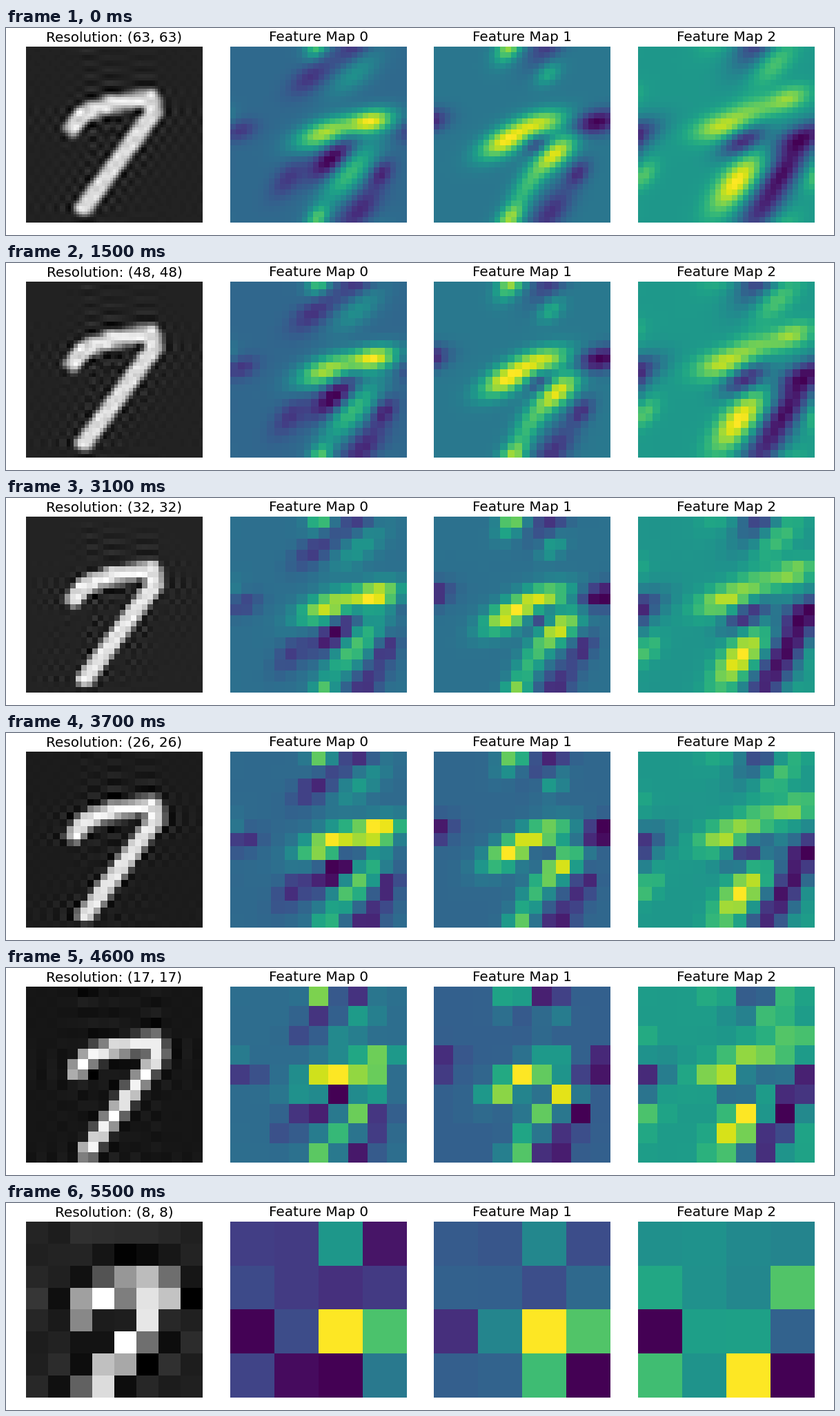
A matplotlib script that plays this animation: 1200x300 px, repeating every 5.6 s.

```python
import numpy as np
import matplotlib.pyplot as plt
from matplotlib.animation import FuncAnimation

W, H, DPI = 1200, 300, 120
LEFT, PITCH, TOP = 29, 295.7, 27
SIDE, TALL = 256, 255
SIZES = range(63, 7, -1)

# Pen path of the digit in panel pixels
PEN = [(68, 118), (82, 98), (124, 83), (182, 75), (184, 97), (84, 234)]
PEN_RADIUS = 12

# Base level, then blobs as x, y, height, length
MAPS = [
    (0.31, [(207, 110, .64, 24), (138, 128, .56, 32), (150, 166, -.42, 28),
            (85, 195, -.18, 24), (175, 186, .37, 40), (128, 254, .38, 15),
            (222, 187, -.25, 15), (190, 242, -.24, 32), (118, 45, -.2, 26),
            (182, 40, .18, 32), (14, 124, -.19, 18)]),
    (0.39, [(105, 140, .58, 30), (160, 112, .45, 28), (178, 159, .56, 27),
            (150, 145, -.24, 14), (238, 112, -.41, 24), (112, 254, .46, 20),
            (138, 205, .26, 24), (212, 187, -.25, 15), (172, 245, -.25, 32),
            (168, 40, .22, 15)]),
    (0.54, [(122, 118, .42, 30), (222, 76, .34, 22), (170, 92, .22, 26),
            (200, 25, .22, 30), (185, 235, -.46, 42), (240, 135, -.52, 34),
            (217, 180, -.4, 30), (155, 140, -.5, 26), (145, 200, .54, 38),
            (8, 190, .24, 18)]),
]


def seg_dist(x, y, a, b):
    (ax, ay), (bx, by) = a, b
    dx, dy = bx - ax, by - ay
    t = np.clip(((x - ax) * dx + (y - ay) * dy) / (dx * dx + dy * dy), 0, 1)
    return np.hypot(x - ax - t * dx, y - ay - t * dy)


def make_digit(size=28):
    step = SIDE / size
    y, x = np.mgrid[:size, :size] * step + 2
    dist = np.min([seg_dist(x, y, a, b) for a, b in zip(PEN, PEN[1:])], axis=0)
    return np.clip(0.5 + 1.3 * (PEN_RADIUS - dist) / step, 0, 1)


def make_field(base, blobs, size=64):
    """Sum of tilted Gaussians on a torus; they lie flatter near y = 100."""
    y, x = np.mgrid[:size, :size] * (SIDE / size) + 4
    field = np.full((size, size), base)
    half = SIDE / 2
    for bx, by, amp, long in blobs:
        short = 6 + long / 4
        tilt = np.radians(52 - 40 * np.exp(-((by - 100) / 55) ** 2))
        dx = (x - bx + half) % SIDE - half
        dy = (y - by + half) % SIDE - half
        c, s = np.cos(tilt), np.sin(tilt)
        u, v = (c * dx - s * dy) / long, (s * dx + c * dy) / short
        field += amp * np.exp(-(u * u + v * v) / 2)
    return field


def resample(img, n):
    """Band-limited (Fourier) resize of a square image."""
    size = len(img)
    t = np.arange(n)[:, None] / n - np.arange(size) / size
    band = min(n, size)
    m = np.ones_like(t)
    for k in range(1, (band - 1) // 2 + 1):
        m += 2 * np.cos(2 * np.pi * k * t)
    if band % 2 == 0:
        m += np.cos(np.pi * band * t)
    m /= size
    return m @ img @ m.T


def set_title(ax, text):
    ax.set_title(text, fontsize=12, pad=4.8, fontfamily="DejaVu Sans")


digit = make_digit()
fields = [make_field(*spec) for spec in MAPS]

fig = plt.figure(figsize=(W / DPI, H / DPI), dpi=DPI, facecolor="white")
axes, images = [], []
for i in range(4):
    left = round(LEFT + i * PITCH)
    ax = fig.add_axes([left / W, 1 - (TOP + TALL) / H, SIDE / W, TALL / H])
    ax.axis("off")
    if i:
        set_title(ax, f"Feature Map {i - 1}")
    images.append(ax.imshow(np.zeros((2, 2)), extent=(0, 1, 1, 0),
                            cmap="viridis" if i else "gray",
                            interpolation="nearest", aspect="auto"))
    axes.append(ax)


def update(frame):
    n = SIZES[frame]
    set_title(axes[0], f"Resolution: ({n}, {n})")
    grids = [resample(digit, n)] + [resample(f, n)[::2, ::2] for f in fields]
    for im, grid in zip(images, grids):
        im.set_data(grid)
        im.set_clim(grid.min(), grid.max())
    return images


anim = FuncAnimation(fig, update, frames=len(SIZES), interval=100,
                     repeat=True, repeat_delay=0, blit=False)
plt.show()
```
